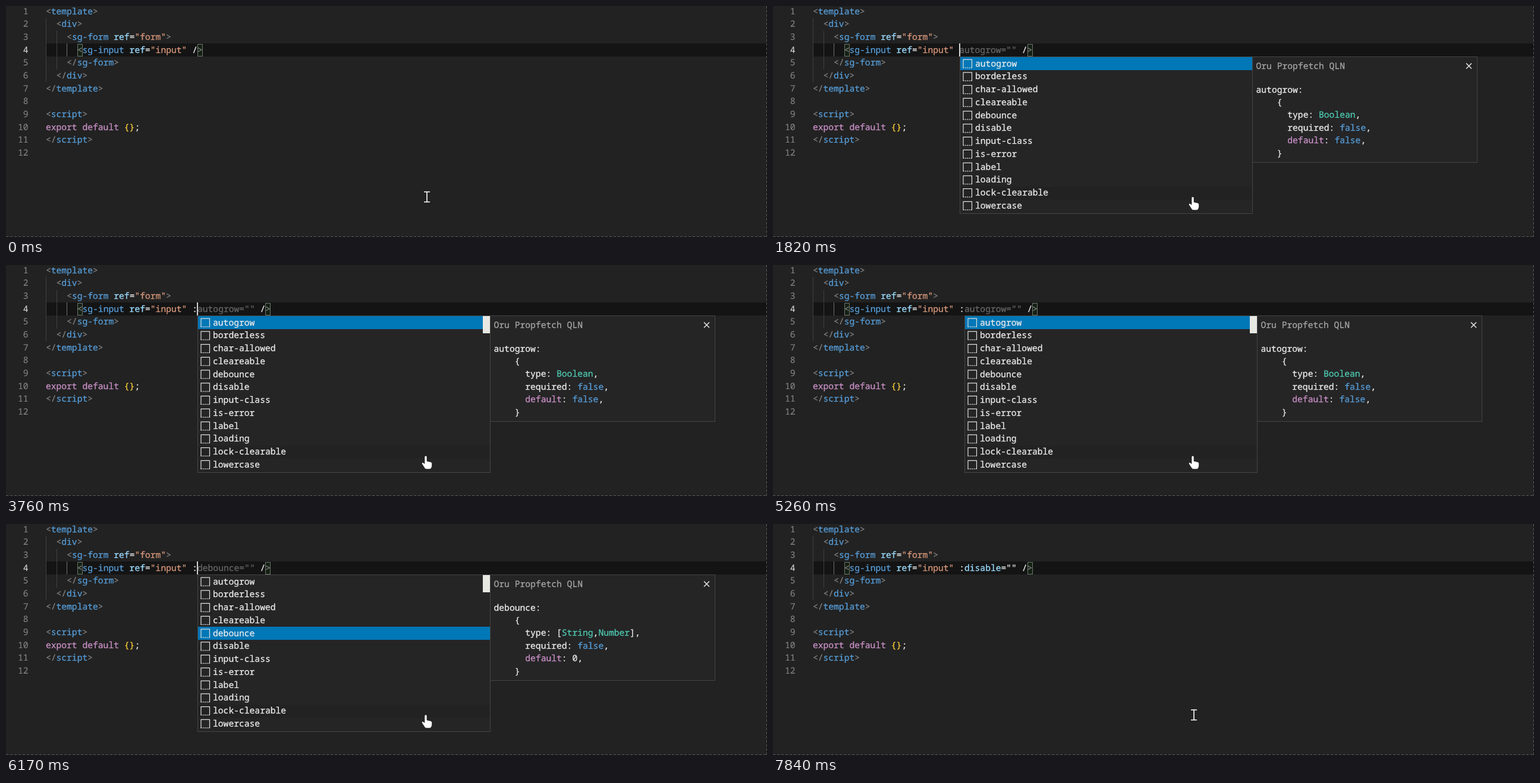
An HTML page that plays this animation: 1280x389 px, repeating every 8000 ms.

```html
<!DOCTYPE html>
<html lang="en">
<head>
<meta charset="utf-8">
<title>Editor completion</title>
<style>
html, body { margin: 0; width: 100%; height: 100%; overflow: hidden; background: #222; }
#stage {
  position: relative; width: 1280px; height: 389px; overflow: hidden; background: #222;
  font: 500 14.662px "Noto Sans Mono", "DejaVu Sans Mono", monospace;
  text-rendering: geometricPrecision; font-variant-ligatures: none; color: #ececec;
}
#stage * { position: absolute; box-sizing: border-box; }
#stage span { position: static; }
.row { height: 22px; line-height: 22px; white-space: pre; -webkit-text-stroke: .3px currentColor; }
.num { left: 0; width: 37.5px; text-align: right; color: #858585; -webkit-text-stroke-width: .1px; }
.num.now { color: #d8d8d8; }
.w { color: #ececec; } .g { color: #808080; } .b { color: #569cd6; }
.a { color: #9cdcfe; } .o { color: #d6967a; } .p { color: #c990c6; }
.y { color: #ffd23c; } .t { color: #4ec9b0; } .h { color: #666; } .m { color: #a6a6a6; }
#band { left: 67px; top: 63px; width: 1213px; height: 22px; background: #141414; }
.guide { width: 1px; background: #404040; }
.match { top: 64px; width: 9px; height: 21px; border: 1px solid #6c776c; background: #142014; }
#caret { top: 63px; width: 2px; height: 22px; background: #d4d4d4; }
#popup { top: 85px; left: 314px; }
.pane { top: 0; background: #252526; border: 1px solid #454545; }
#list { left: 0; width: 493px; height: 265px; }
#info { left: 492px; width: 379px; height: 179px; }
#hover { left: 0; top: 218px; width: 491px; height: 22px; background: #222223; }
#pick { left: 0; width: 491px; height: 22px; background: #0077b7; }
#thumb { left: 479px; top: 0; width: 12px; height: 29px; background: #e8e8e3; }
.edge { background: repeating-linear-gradient(var(--dir), #5c5c5c 0 4px, transparent 4px 7px); }
#bottom { --dir: 90deg; left: 0; top: 388px; width: 1280px; height: 1px; }
#right { --dir: 180deg; left: 1279px; top: 0; width: 1px; height: 389px; }
svg { left: 0; top: 0; overflow: visible; }
</style>
</head>
<body>
<div id="stage">
  <div id="band"></div>
  <div class="guide" style="left:67px;top:20px;height:108px"></div>
  <div class="guide" style="left:85px;top:42px;height:65px"></div>
  <div class="guide" style="left:102px;top:63px;height:22px;background:#707070"></div>
  <div class="match" id="open"></div>
  <div class="match" id="close"></div>
  <div id="code"></div>
  <div id="caret"></div>
  <div id="popup">
    <div class="pane" id="list">
      <div id="hover"></div>
      <div id="pick"></div>
      <div id="items"></div>
      <div id="thumb"></div>
    </div>
    <div class="pane" id="info">
      <svg width="1" height="1"><path d="M359 10.5l9 9m0-9l-9 9" stroke="#e8e8e8" stroke-width="1.5"/></svg>
    </div>
  </div>
  <div class="edge" id="bottom"></div>
  <div class="edge" id="right"></div>
  <svg width="1280" height="389">
    <path id="beam" d="M703 313h10M708 313v17M703 330h10" fill="none" stroke="#fff" stroke-width="1.6"/>
    <path id="hand" d="M704 323.3a2 2 0 0 1 4 0v7l6.5 1.4q2 .6 2 2.6v3q0 2.4-1 4.2-1 2.3-3 2.3h-5.5q-2 0-3-2l-4.5-7q-.5-2.2 1.5-2.4l3 2.2z" fill="#fff" stroke="#111" stroke-width=".6"/>
  </svg>
</div>
<script>
const CHAR = 8.797, LINE = 21.68, ITEM = 21.75, LEFT = 66.9, LOOP = 8000;
const $ = id => document.getElementById(id);
const colX = col => LEFT + col * CHAR;

// Markup: runs split by "|", the first letter of each run is its colour class.
function paint(el, markup) {
  el.replaceChildren(...markup.split('|').filter(Boolean).map(run => {
    const span = document.createElement('span');
    span.className = run[0];
    span.textContent = run.slice(1);
    return span;
  }));
}

function addRow(parent, x, y, markup, cls = '') {
  const el = document.createElement('div');
  el.className = 'row ' + cls;
  el.style.top = y + 'px';
  if (x !== null) el.style.left = x + 'px';
  paint(el, markup);
  parent.append(el);
  return el;
}

const lines = [
  'g<|btemplate|g>',
  'w  |g<|bdiv|g>',
  'w    |g<|bsg-form|w |aref|w=|o"form"|g>',
  '',
  'w    |g</|bsg-form|g>',
  'w  |g</|bdiv|g>',
  'g</|btemplate|g>',
  '',
  'g<|bscript|g>',
  'pexport default|w |y{}|w;',
  'g</|bscript|g>',
  ''
];
const rows = lines.map((markup, i) => {
  const y = -2.4 + i * LINE;
  const num = addRow($('code'), null, y, '', i === 3 ? 'num now' : 'num');
  num.textContent = i + 1;
  return addRow($('code'), LEFT, y, markup);
});
const active = rows[3];

const names = ['autogrow', 'borderless', 'char-allowed', 'cleareable', 'debounce', 'disable',
  'input-class', 'is-error', 'label', 'loading', 'lock-clearable', 'lowercase'];
const special = {
  'char-allowed': ['tArray', 'w() |b=>|w []'],
  'debounce': ['w[|tString|w,|tNumber|w]', 'w0']
};
const icon = y => `<path d="M5 ${y + 14.5}v-14h14.5v14" fill="none" stroke="#e0e0e0" stroke-width="1.2"/>` +
  `<path d="M4.5 ${y + 14.5}h15.5" stroke="#e0e0e0" stroke-width="1.2" stroke-dasharray="2 1.25"/>`;
$('items').innerHTML = '<svg width="1" height="1">' + names.map((n, i) => icon(3.7 + i * ITEM)).join('') + '</svg>';
names.forEach((name, i) => addRow($('items'), 25, -0.3 + i * ITEM, 'w' + name));

addRow($('info'), 5.5, 3.9, 'mOru Propfetch QLN');
const facts = [0, 1, 2, 3, 4, 5].map(i => addRow($('info'), 5.5, 43.5 + i * 21.4, ''));

function showInfo(name) {
  const [type, value] = special[name] || ['tBoolean', 'bfalse'];
  const title = name.startsWith('char') ? 'achar|w' + name.slice(4) : 'w' + name;
  [title + '|w:', 'w    {',
    'w      type: |' + type + '|w,',
    'w      required: |bfalse|w,',
    'w      |pdefault|w: |' + value + '|w,',
    'w    }'].forEach((markup, i) => paint(facts[i], markup));
}

// Each step overrides part of the state from its time on.
const steps = [
  [0, { typed: '', col: 27, pick: -1, x: 314, thumb: 0, hand: false }],
  [1770, { typed: 'w ', col: 28 }],
  [1820, { pick: 0, hand: true }],
  [1870, { thumb: 0.5 }],
  [1920, { thumb: 1 }],
  [2780, { typed: 'w :', col: 29 }],
  [2850, { x: 322 }],
  [5620, { pick: 1 }],
  [5820, { pick: 2 }],
  [5970, { pick: 3 }],
  [6170, { pick: 4 }],
  [6410, { pick: 5 }],
  [7290, { typed: 'w :|adisable|w=""', col: 38, pick: -1 }],
  [7340, { hand: false }]
];
const blinks = [500, 1010, 1470, 2290, 2780, 3250, 3760, 4250, 4770, 5260, 5770, 6210, 6730, 7240, 7290, 7840];

function render(s) {
  const open = s.pick >= 0;
  const ghost = open ? 'h' + names[s.pick] + '=""' : '';
  paint(active, ['w      |g<|bsg-input|w |aref|w=|o"input"', s.typed, ghost, 'w /|g>'].join('|'));
  $('open').style.left = colX(6) + 'px';
  $('close').style.left = colX(active.textContent.length - 1) + 'px';
  $('caret').style.left = Math.floor(colX(s.col) - 0.2) + 'px';
  $('popup').style.display = open ? '' : 'none';
  $('popup').style.left = s.x + 'px';
  $('thumb').style.opacity = s.thumb;
  if (open) {
    $('pick').style.top = s.pick * ITEM + 'px';
    showInfo(names[s.pick]);
  }
  $('hand').style.display = s.hand ? '' : 'none';
  $('beam').style.display = s.hand ? 'none' : '';
}

let shown = 0;
function frame() {
  const t = performance.now() % LOOP;
  const past = steps.filter(([at]) => at <= t);
  if (past.length !== shown) {
    shown = past.length;
    render(Object.assign({}, ...past.map(step => step[1])));
  }
  const lit = blinks.filter(at => at <= t).length % 2;
  $('caret').style.visibility = lit ? 'visible' : 'hidden';
  requestAnimationFrame(frame);
}
frame();
</script>
</body>
</html>
```
